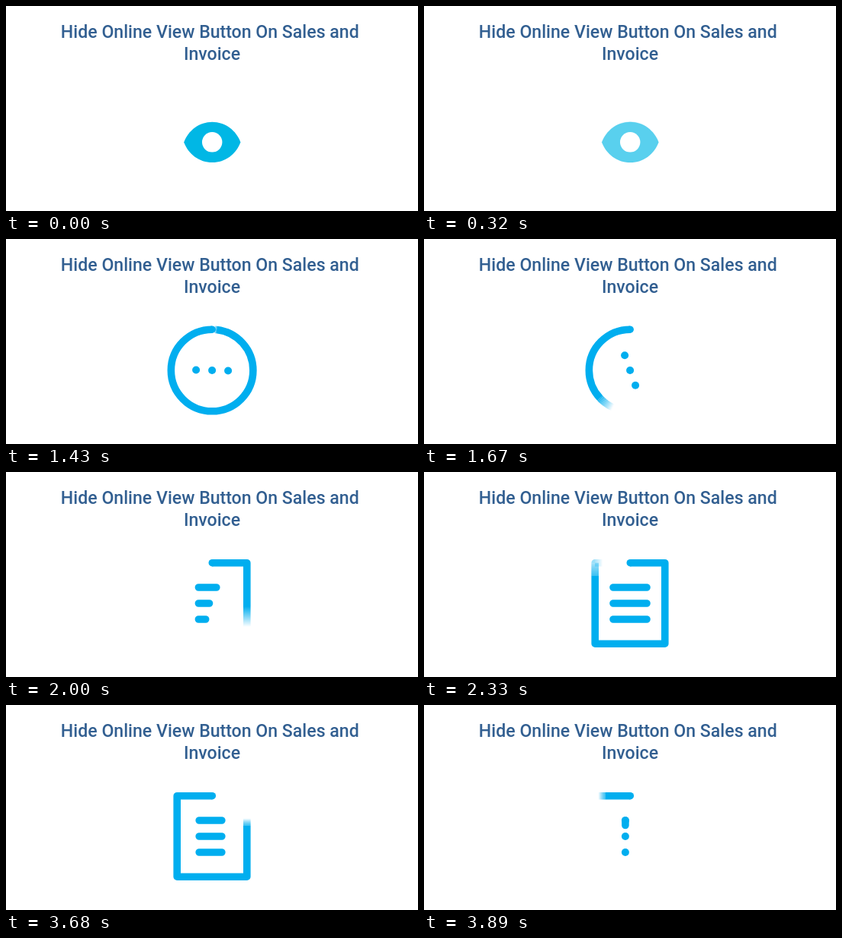
These frames come from a looping animation (540 by 270 pixels, 3.92 s). An HTML page with a canvas:

```html
<!DOCTYPE html>
<html lang="en">
<head>
<meta charset="utf-8">
<title>Hide Online View Button</title>
<style>
  html, body { margin: 0; width: 100%; height: 100%; overflow: hidden; background: #fff; }
  canvas, svg { position: absolute; left: 0; top: 0; width: 540px; height: 270px; }
  text { font: 500 23.1px Roboto, "Open Sans", sans-serif; fill: #325f91; text-anchor: middle; }
</style>
</head>
<body>
<canvas id="stage"></canvas>
<svg viewBox="0 0 540 270">
  <text x="267.3" y="41.7">Hide Online View Button On Sales and</text>
  <text x="270" y="70.7">Invoice</text>
</svg>
<script>
const LOOP = 3920;
const BLUE = '#00aeef', EYE_BLUE = '#00b7e5';
const LINE = 9.6, DOT = 5;
const CX = 270.1, CY = 173, RADIUS = 53.8, GAP = 21;
const ROWS = [152, 173, 194];
const ROW_START = [1844, 1885, 1909];

const canvas = document.getElementById('stage');
const ctx = canvas.getContext('2d');
const dpr = window.devicePixelRatio || 1;
canvas.width = 540 * dpr;
canvas.height = 270 * dpr;

const span = (t, a, b) => Math.min(1, Math.max(0, (t - a) / (b - a)));
const smooth = (t, a, b) => (1 - Math.cos(Math.PI * span(t, a, b))) / 2;
const mix = (a, b, k) => a + (b - a) * k;

function makePath(d) {
  const el = document.createElementNS('http://www.w3.org/2000/svg', 'path');
  el.setAttribute('d', d);
  return { shape: new Path2D(d), length: el.getTotalLength(), at: s => el.getPointAtLength(s) };
}

const ring = makePath(`M${CX} ${CY - RADIUS}a${RADIUS} ${RADIUS} 0 0 1 0 ${2 * RADIUS}a${RADIUS} ${RADIUS} 0 0 1 0 ${-2 * RADIUS}z`);
const sheet = makePath('M270.3 119.7H315.8V226.2H224.2V119.7z');
const lens = new Path2D('M270.3 152.7C253.3 152.7 238.9 163.8 233.2 179.4C238.9 195 253.3 206 270.3 206C287.3 206 301.7 195 307.4 179.4C301.7 163.8 287.3 152.7 270.3 152.7z');

function dot(x, y, r = DOT) {
  ctx.beginPath();
  ctx.arc(x, y, r, 0, 2 * Math.PI);
  ctx.fill();
}

function bar(x1, y1, x2, y2) {
  ctx.lineCap = 'round';
  ctx.beginPath();
  ctx.moveTo(x1, y1);
  ctx.lineTo(x2, y2 + 0.01);
  ctx.stroke();
}

function piece(path, from, to) {
  if (to <= from) return;
  ctx.lineCap = 'butt';
  ctx.setLineDash([to - from, path.length * 2]);
  ctx.lineDashOffset = -from;
  ctx.stroke(path.shape);
  ctx.setLineDash([]);
}

// Thin slices, from solid at one length to nothing at the other
function fadePiece(path, solid, empty) {
  const count = Math.ceil(Math.abs(solid - empty));
  for (let i = 0; i < count; i++) {
    const a = mix(solid, empty, i / count), b = mix(solid, empty, (i + 1) / count);
    ctx.globalAlpha = 1 - (i + 0.5) / count;
    piece(path, Math.min(a, b), Math.max(a, b));
  }
  ctx.globalAlpha = 1;
}

function erase(path, k, fade) {
  if (k <= 0) return ctx.stroke(path.shape);
  if (k >= 1) return;
  const tip = k * path.length;
  const solid = Math.min(path.length, tip + Math.min(fade, tip));
  fadePiece(path, solid, tip);
  piece(path, solid, path.length);
  const end = path.at(path.length);
  dot(end.x, end.y, LINE / 2);
}

function grow(path, k, fade) {
  if (k <= 0) return;
  if (k >= 1) return ctx.stroke(path.shape);
  const tip = k * path.length;
  const solid = tip - Math.min(fade, tip, path.length - tip);
  const start = path.at(0);
  dot(start.x, start.y, LINE / 2);
  piece(path, 0, solid);
  fadePiece(path, solid, tip);
}

function drawEye(t) {
  const alpha = 1 - 0.05 * Math.max(0, (t - 40) / 40);
  ctx.fillStyle = ctx.strokeStyle = EYE_BLUE;
  ctx.globalAlpha = alpha;
  ctx.fill(lens);
  if (alpha < 1) {
    ctx.globalAlpha = 0.3 * alpha;
    ctx.lineWidth = 1;
    ctx.stroke(lens);
  }
  ctx.globalAlpha = 1;
  ctx.fillStyle = '#fff';
  dot(270.2, 179.3, 13.2);
}

function drawDots(t) {
  const angle = smooth(t, 1400, 1790) * Math.PI / 2;
  for (const i of [-1, 0, 1]) {
    dot(CX + i * GAP * Math.cos(angle), CY + i * GAP * Math.sin(angle));
  }
}

function drawRows(t) {
  const left = mix(270, 248, smooth(t, 1790, 2088));
  const shrink = smooth(t, 3560, 3870);
  const drop = 6.5 * smooth(t, 3770, 3890);
  ROWS.forEach((y, i) => {
    const right = left + 44 * smooth(t, ROW_START[i], ROW_START[i] + 300);
    const x1 = mix(left, 263.9, shrink), x2 = mix(right, 263.9, shrink);
    if (x2 - x1 < 0.5) dot(x1, y);
    else bar(x1, y, x2, y);
    if (i === 0 && drop > 0) bar(x1, y, x1, y + drop);
  });
}

function draw(t) {
  ctx.setTransform(dpr, 0, 0, dpr, 0, 0);
  ctx.clearRect(0, 0, 540, 270);
  if (t < 640) return drawEye(t);

  ctx.fillStyle = ctx.strokeStyle = BLUE;
  ctx.lineWidth = LINE;
  ctx.lineJoin = 'round';
  erase(ring, smooth(t, 1400, 1897), 21);
  if (t < 3560) grow(sheet, 1 - Math.pow(1 - span(t, 1850, 2420), 1.3), 27);
  else erase(sheet, smooth(t, 3560, 3978), 9);
  if (t < 1790) drawDots(t);
  else drawRows(t);
}

// The eye moves in steps of 40 ms, the rest in steps of 30 ms
const stepTime = t => t < 680 ? Math.floor(t / 40) * 40 : 680 + Math.floor((t - 680) / 30) * 30;

const origin = performance.now();

function tick(now) {
  draw(stepTime(Math.max(0, now - origin) % LOOP));
  requestAnimationFrame(tick);
}

tick(origin);
</script>
</body>
</html>
```
